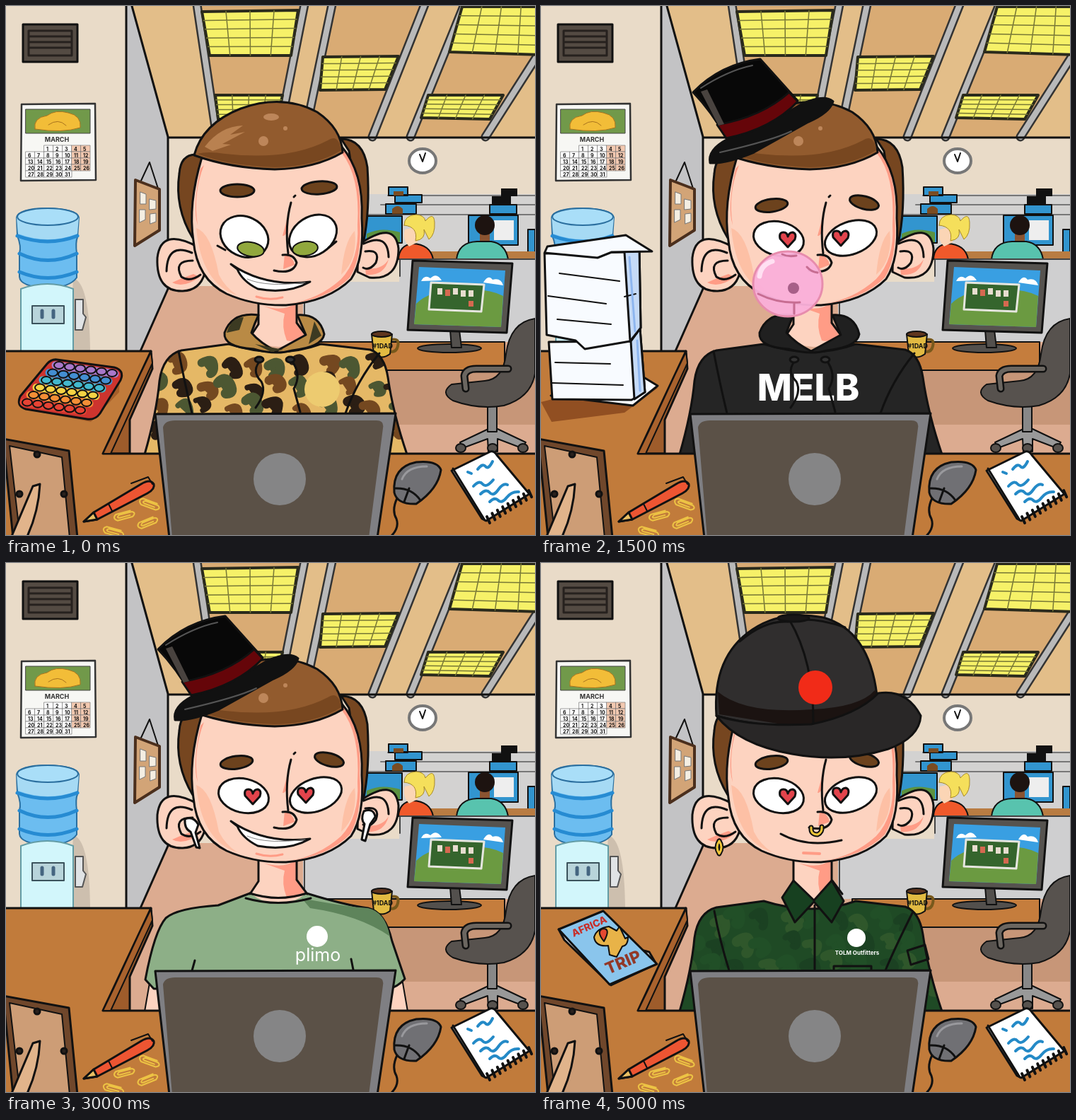
An HTML page with a canvas for the animation above (5500 ms loop, 748x748 px).

```html
<!DOCTYPE html>
<html lang="en">
<head>
<meta charset="utf-8">
<title>Office outfits</title>
<style>
html,body{margin:0;width:100%;height:100%;overflow:hidden}
canvas{display:block;width:100%;height:100%}
</style>
</head>
<body>
<canvas width="748" height="748"></canvas>
<script>
const g = document.querySelector('canvas').getContext('2d');
g.lineJoin = g.lineCap = 'round';
const SKIN = '#fdd3c0', BLUSH = '#ff9c86', BROW = '#6c421d', IRIS = '#91a83d';
const range = n => [...Array(n).keys()];
const lerp = (a, b, t) => a + (b - a) * t;

function fill(d, color) {
  g.fillStyle = color;
  g.fill(new Path2D(d));
}
function line(d, width = 3, color = '#111') {
  g.lineWidth = width;
  g.strokeStyle = color;
  g.stroke(new Path2D(d));
}
function ink(d, color, width = 3, edge) {
  fill(d, color);
  line(d, width, edge);
}
function oval(x, y, rx, ry, color, width = 3, angle = 0, edge = '#111') {
  g.beginPath();
  g.ellipse(x, y, rx, ry, angle * Math.PI / 180, 0, 7);
  g.fillStyle = color;
  g.fill();
  g.lineWidth = width;
  g.strokeStyle = edge;
  if (width) g.stroke();
}
function write(text, x, y, size, color = '#111', weight = 700, angle = 0, align = 'left', family = 'Inter,sans-serif') {
  g.save();
  g.translate(x, y);
  g.rotate(angle * Math.PI / 180);
  g.font = `${weight} ${size}px ${family}`;
  g.textAlign = align;
  g.fillStyle = color;
  g.fillText(text, 0, 0);
  g.restore();
}
function clipped(d, paint) {
  g.save();
  g.clip(new Path2D(d));
  paint();
  g.restore();
}

// Ceiling lamp: a quad with evenly spaced slats.
function lamp([ax, ay, bx, by, cx, cy, dx, dy]) {
  let grid = '';
  for (const t of [.2, .4, .6, .8]) grid += `M${lerp(ax, dx, t)} ${lerp(ay, dy, t)}L${lerp(bx, cx, t)} ${lerp(by, cy, t)}`;
  for (const t of [.25, .5, .75]) grid += `M${lerp(ax, bx, t)} ${lerp(ay, by, t)}L${lerp(dx, cx, t)} ${lerp(dy, cy, t)}`;
  ink(`M${ax} ${ay}L${bx} ${by} ${cx} ${cy} ${dx} ${dy}Z`, '#f6f168', 4, '#2a2a1c');
  line(grid, 1.5, '#777735');
}

function room() {
  fill('M0 0H748V748H0Z', '#e9dbc8');
  fill('M229 396H748V640H130L190 488Z', '#dcab90');
  fill('M170 0H178L229 185V400L190 490H170Z', '#c3c3c5');
  fill('M178 0H748V186H229Z', '#e3be89');
  fill('M270 0H422L385 186H298ZM461 0H592L518 186H422ZM648 0H748V75L678 186H572Z', '#d9ab74');
  for (const [a, b] of [[270, 298], [422, 385], [461, 422], [592, 518], [648, 572], [754, 678]]) {
    const d = `M${a} ${a > 750 ? 66 : -2}L${b} 185`;
    line(d, 13, '#333');
    line(d, 8, '#b9b9b9');
  }
  [[277,8,413,6,403,70,288,70], [448,72,555,71,536,118,444,119], [645,1,756,1,756,69,627,65],
    [597,126,703,126,684,160,587,158], [296,126,391,126,384,160,300,160]].forEach(lamp);
  fill('M229 186H415V396H229Z', '#e9dbc8');
  line('M170 0V488M178 0L229 185V400L190 488M229 186H748');
  ink('M24 26H101V79H24Z', '#544b43');
  line('M32 35H93V70H32ZM34 43H91M34 51H91M34 59H91', 3, '#26211e');
  calendar();
  line('M191 247L203 221L215 258', 2);
  ink('M183 246L217 259V317L182 339Z', '#d2a477', 4, '#4b2f1d');
  ink('M190 263l8 3v14h-8zM203 273l9 2v12l-9 1zM189 288h8v14l-8 4zM204 294l8-1v12l-8 3z', '#f4eee2', 1, '#777');
  cooler();
  coworkers();
  ink('M440 475H705V515H440Z', '#c57d3d', 2);
  line('M544 472Q557 469 554 481Q552 490 543 489', 4, '#78591c');
  ink('M517 464H546L543 492Q531 501 520 492Z', '#e2ba42', 2);
  oval(531, 464, 14, 4, '#60361e', 2);
  write('#1DAD', 518, 484, 9);
  monitor();
  chair();
}

function calendar() {
  ink('M22 139L126 138 127 246 21 247Z', '#f7f7f4', 2.5, '#333');
  ink('M28 146H119V180H28Z', '#71994a', 1, '#444');
  ink('M41 174Q38 158 58 155Q70 146 88 151Q107 155 105 172Q80 180 41 174Z', '#f2bd38', 1, '#a8731e');
  line('M60 168Q74 158 85 169', 1, '#a8731e');
  write('MARCH', 72, 192, 9, '#333', 700, 0, 'center');
  for (const i of range(31)) {
    const n = i + 2, x = 28 + n % 7 * 13, y = 205 + (n / 7 | 0) * 9;
    ink(`M${x} ${y - 8}h13v9h-13z`, n % 7 > 4 ? '#f3c9b0' : '#fff', .7, '#777');
    write(i + 1, x + 3, y, 7);
  }
}

function cooler() {
  fill('M95 385Q118 390 119 488H90Z', '#cdbfae');
  ink('M15 299Q18 286 59 286Q100 287 103 299L101 327Q98 334 100 350V384Q90 398 59 399Q20 397 19 383V350Q22 340 16 325Z', '#6cbdf0', 2, '#2b6f9f');
  fill('M15 299Q59 280 103 299L101 322Q60 338 17 322Z', '#a6daf4');
  line('M19 350Q59 369 100 350M19 376Q59 393 100 376M16 325Q59 341 101 325', 5, '#268bd2');
  oval(59, 298, 43, 12, '#a9def8', 2, 0, '#2b6f9f');
  ink('M21 400Q59 386 95 400V490H21Z', '#d2f6fb', 2, '#639ca5');
  ink('M37 424H82V449H37Z', '#b8d4da', 2, '#3b525c');
  line('M51 431v9M67 431v9', 5, '#456580');
  ink('M98 415H109V435L113 440 108 458H98Z', '#e0e3e5', 2, '#555');
}

function coworkers() {
  oval(589, 219, 19, 17, '#fff', 4, 0, '#777');
  line('M585 210L589 220L593 208', 2);
  fill('M500 266H748V358H500Z', '#d3d2d1');
  line('M540 268H748M530 281H748M505 295H748', 2, '#777');
  ink('M541 256h27v12h-27zM550 267h38v11h-38zM537 280h43v14h-43zM506 297h54v38h-54zM684 281h38v13h-38zM738 316h10v36h-10zM654 296h70v42h-70z', '#3295cf', 2);
  fill('M700 258h23v11h-23zM687 269h27v11h-27z', '#111');
  fill('M690 303h28v28h-28z', '#eee');
  fill('M510 322Q530 312 557 320V334H510Z', '#5c9240');
  fill('M548 262h14v6h-14zM546 287q8-8 15 0v7h-15z', '#7a4c22');
  fill('M500 347H748V358H500Z', '#b97c42');
  ink('M555 358Q556 338 575 336Q600 337 604 358Z', '#f0592b', 2);
  fill('M564 316Q560 330 570 340L582 334V312Z', '#fbd5b5');
  ink('M563 310Q563 296 580 295Q592 296 593 304Q605 290 606 306Q607 323 598 330L591 316Q594 330 579 332Q583 312 563 310Z', '#f5df5b', 1, '#a88a25');
  fill('M670 318h14v16h-14z', '#8a5431');
  ink('M637 358Q640 334 666 333H686Q706 336 710 358Z', '#58c3ae', 2);
  oval(677, 310, 14, 14, '#1d1310', 0);
  fill('M420 390H556L557 358H748V475H420Z', '#cfcfd0');
  line('M422 420V474M557 358H748M557 358V382', 2, '#444');
  fill('M440 515H748V592H540Z', '#c79678');
}

function monitor() {
  oval(627, 484, 45, 6, '#53504d', 2);
  ink('M628 458h13l3 25h-14z', '#53504d', 2);
  ink('M575 360L716 364 708 462 568 458Z', '#56534f');
  fill('M584 369L706 374 700 454 577 450Z', '#399fe2');
  fill('M580 421Q600 401 640 402Q680 398 703 410L700 454 577 450Z', '#6b9a41');
  fill('M587 389q5-10 13-4q9-9 16 3zM675 391q7-12 13-4q12-3 15 8z', '#fff');
  ink('M601 391L676 394 672 432 598 429Z', '#35652d', 3, '#e6e6df');
  fill('M610 399h7v9h-7zM632 399h7v9h-7zM654 402h7v9h-7zM643 402h7v9h-7z', '#e7ddcf');
  fill('M621 401h7v9h-7zM654 417h7v8h-7z', '#d56950');
}

function chair() {
  ink('M682 598L642 617 646 625 681 612 682 630H695V612L729 625 735 617 695 598Z', '#999', 2);
  ink('M681 560h13v42h-13z', '#888', 2);
  ink('M748 442Q713 447 707 492Q703 528 677 530L630 535Q613 547 632 558Q668 571 704 565Q742 554 748 520Z', '#57524e', 2);
  const arm = 'M650 541L648 523Q650 512 668 513H710';
  line(arm, 11);
  line(arm, 6, '#6b6660');
  for (const x of [643, 688, 731]) oval(x, 625, 7, 6, '#57524e', 2);
}

const BODY = 'M196 634Q213 575 217 530Q222 494 248 487L315 478Q385 500 445 478L515 486Q535 493 540 525Q547 575 567 634Z';

function camouflage(colors, seed) {
  const rnd = () => (seed = seed * 16807 % 2147483647) / 2147483647;
  clipped(BODY, () => {
    for (const i of range(44)) {
      const x = 196 + i % 11 * 34 + rnd() * 16, y = 496 + (i / 11 | 0) * 30 + rnd() * 14;
      const d = `M${x} ${y}q${9 + rnd() * 10} ${-14 + rnd() * 10} 17 2t${-3 - rnd() * 8} ${9 + rnd() * 6}`;
      ink(d, colors[i % 3], 7 + rnd() * 8, colors[i % 3]);
    }
  });
  line(BODY);
}

function neck() {
  fill('M357 410H412V450L425 467Q386 497 345 467L357 450Z', SKIN);
  fill('M363 424Q393 433 410 420V445L422 466Q408 476 397 473Q389 453 394 435Z', BLUSH);
  line('M357 418V450L345 468M411 418V448L426 468');
}
function hood(color) {
  neck();
  ink('M357 437Q320 432 309 462Q307 482 350 485Q381 494 405 487Q447 482 450 464Q443 435 412 437L424 465Q402 477 382 488Q360 477 347 462Q351 450 357 437Z', color);
  line('M244 488Q252 530 263 576M528 491Q496 530 480 576M362 499Q345 515 361 531Q369 546 353 568M403 500Q419 521 407 541L416 574');
  oval(358, 500, 6, 4, '#333');
  oval(402, 500, 6, 4, '#333');
}
function shirt(color, shade) {
  ink('M196 634L204 588H560L568 634Z', SKIN, 2);
  ink('M197 589Q210 520 226 502Q242 488 300 484L345 467Q385 480 425 467Q480 484 512 488Q536 493 546 535L564 588Q553 600 541 602H209Z', color);
  fill('M418 474Q480 486 512 488Q536 493 543 528Q500 498 430 488Z', shade);
  line('M267 562L262 580M488 560L492 580');
  neck();
  line('M339 474Q385 487 431 474M345 467Q385 480 425 467');
}

// Hand-drawn notes hovering in the air.
function sums() {
  const note = (s, x, y, size = 26, angle = 0) => write(s, x, y, size, '#ffffffcc', 'italic 300', angle, 'left', '"Open Sans","Noto Sans",sans-serif');
  line('M189 150L192 207 255 195M194 194L207 170 216 178 231 155 234 165 241 150M205 210L245 204M481 441H538M428 432H454M433 433L429 456M445 433L444 456M471 424Q464 444 473 465M547 421Q559 444 546 467', 2, '#ffffffcc');
  note('= 22', 506, 195, 27, -8);
  note('+ 8', 511, 278, 22);
  note('x+y=2', 206, 285, 31);
  note('if x = 2', 163, 332);
  note('then x = ..', 163, 367);
  note('11010', 267, 400, 28);
  note('ϕ', 268, 436);
  note('n', 288, 442, 20);
  note('A', 484, 358);
  note('2', 499, 326, 22);
  note('16√2', 414, 412);
  note('5', 475, 402, 17);
  note('+ 5', 490, 415, 23);
  note('1+n', 487, 437, 19);
  note('2 + n', 491, 463, 19);
}

function head() {
  ink('M272 341Q219 312 214 356Q212 404 250 403Q274 402 281 378Z', SKIN);
  ink('M498 338Q550 301 555 343Q555 388 514 384L497 376Z', SKIN);
  fill('M265 379Q250 384 235 391Q251 400 274 383ZM508 371Q532 374 541 358Q535 382 509 380Z', BLUSH);
  line('M263 349Q228 334 227 375M264 360Q236 360 248 383Q260 391 275 380M506 336Q540 320 541 355M508 347Q530 344 523 363Q514 375 505 370');
  ink('M270 210Q247 209 245 237Q238 285 264 328L279 215Z', '#764620');
  ink('M474 188Q505 188 511 228Q515 290 505 336L485 205Z', '#764620');
  const face = 'M277 214Q257 280 265 332Q270 386 312 407Q350 424 396 423Q456 418 488 386Q507 357 503 300Q506 235 474 198Z';
  fill(face, SKIN);
  fill('M269 314Q290 320 301 380Q310 398 327 409Q276 393 269 314ZM493 318Q478 333 474 380Q498 358 493 318Z', '#fdc0a5');
  fill('M474 207Q501 240 497 310Q500 358 474 386Q442 415 400 421Q455 415 486 384Q504 356 500 298Q504 236 474 198ZM275 230Q263 285 271 310Q264 265 280 225Z', BLUSH);
  line(face);
  const hair = 'M266 211Q278 166 332 145Q391 124 440 150Q474 173 476 207Q437 230 380 231Q315 229 266 211Z';
  fill(hair, '#925b2e');
  fill('M271 209Q285 205 310 209Q400 219 455 190Q470 180 474 204Q437 227 380 228Q315 226 271 209Z', '#784720');
  fill('M281 199Q303 170 335 169L317 182 338 178 306 195 318 196 292 205Z', '#b98150');
  oval(375, 157, 11, 5, '#bd865a', 0);
  oval(364, 191, 7, 7, '#bd865a', 0);
  oval(395, 173, 3, 3, '#bd865a', 0);
  line(hair);
}
function nose() {
  fill('M394 351Q406 354 408 366L392 372ZM397 303L391 325Q399 325 399 303Z', BLUSH);
  line('M403 278Q394 310 399 350M391 352Q407 350 411 363Q406 380 379 374M409 268L407 270');
}
function heart(x, y) {
  ink(`M${x} ${y + 10}l-11-12q-2-9 5-9q5 0 6 6q2-6 7-6q6 2 3 10z`, '#e2444c');
}

const items = {
  camo() {
    fill(BODY, '#e5b866');
    camouflage(['#2b1e14', '#744820', '#4c5732'], 71);
    hood('#b98a45');
    fill('M312 462Q318 441 336 440L330 458ZM352 478L392 486 375 489ZM428 478L446 466 436 446Z', '#3c3a22');
    oval(447, 542, 25, 25, '#edcb70', 0);
  },
  black() {
    ink(BODY, '#252525');
    write('MELB', 378, 558, 52, '#fff', 800, 0, 'center');
    hood('#202020');
  },
  army() {
    fill(BODY, '#1f4a25');
    camouflage(['#1b4122', '#2f572b', '#214f27'], 19);
    neck();
    ink('M357 449L341 473 359 508 386 479 411 508 428 478 411 449 386 477Z', '#174020');
    line('M387 484V576M245 492Q253 535 266 576M525 495Q500 545 487 576M518 548L543 540 548 560 523 568ZM414 576V570H467V576');
    oval(446, 530, 13, 13, '#fff', 0);
    write('TOLM Outfitters', 447, 554, 8, '#fff', 700, 0, 'center');
  },
  tee() {
    shirt('#302827', '#171312');
    oval(384, 540, 24, 24, '#fff', 0);
  },
  green() {
    shirt('#8daf87', '#5e845b');
    oval(440, 528, 15, 15, '#fff', 0);
    write('plimo', 441, 563, 25, '#fff', 400, 0, 'center');
  },

  look() {
    oval(337, 326, 35, 28, '#fff', 3, 25);
    oval(434, 325, 36, 27, '#fff', 3, -33);
    oval(346, 344, 19, 10, IRIS, 2, 10);
    oval(423, 343, 18, 10, IRIS, 2, -7);
    line('M299 339L310 345M456 342L467 333');
    oval(327, 261, 24, 9, BROW);
    oval(443, 257, 25, 9, BROW, 3, -4);
  },
  angry() {
    ink('M305 307Q336 288 369 323ZM404 325Q423 295 467 302Z', SKIN);
    const eyes = 'M306 307Q325 327 368 322Q366 351 345 356Q303 352 306 307ZM404 325Q440 328 467 302Q474 345 430 354Q403 352 404 325Z';
    fill(eyes, '#fff');
    clipped(eyes, () => {
      oval(344, 344, 19, 11, IRIS, 2);
      oval(423, 342, 18, 11, IRIS, 2);
    });
    line(eyes);
    oval(350, 275, 17, 7, BROW, 3, 17);
    oval(433, 273, 17, 8, BROW, 3, -27);
    line('M374 283L389 292M409 291L416 284', 3, BLUSH);
  },
  love() {
    oval(336, 329, 36, 24, '#fff', 3, 13);
    oval(438, 328, 38, 23, '#fff', 3, -20);
    heart(349, 331);
    heart(424, 329);
    oval(326, 282, 23, 9, BROW, 3, -8);
    oval(457, 278, 21, 9, BROW, 3, 15);
  },

  grin() {
    ink('M318 365Q366 398 430 390Q398 408 356 400Q334 389 327 372Z', '#fff');
    line('M341 386Q368 398 423 391', 1, '#888');
    line('M354 411Q372 417 391 412', 3, BLUSH);
  },
  talk() {
    ink('M350 394Q367 396 379 388Q392 392 409 393Q408 410 381 411Q358 409 350 394Z', '#271414');
    fill('M363 404Q376 396 395 405Q381 413 363 404Z', '#de6b67');
    fill('M369 394L380 390 396 393 390 397H372Z', '#fff');
  },
  wave() { line('M345 395Q358 402 370 394Q380 387 389 395Q405 402 430 390'); },
  smile() {
    line('M339 383Q375 403 425 392');
    line('M371 410L394 411', 4, BLUSH);
  },
  gum() {
    oval(349, 393, 49, 46, '#fab0daf4', 3, 0, '#e78cad');
    line('M307 407Q335 421 366 419M358 420V435M341 351Q349 355 361 353M376 369Q382 376 391 377', 3, '#c76d92');
    oval(357, 399, 8, 8, '#a75f88', 0);
    line('M309 382Q311 366 327 361', 7, '#ffe0f2');
  },

  glasses() {
    ink('M288 322L373 325 368 355 298 358ZM404 323L490 320 478 353 410 357Z', '#a5dce2aa');
    line('M263 331L288 332M373 335Q389 326 405 334M489 329L514 325');
    line('M322 327L305 353M341 327L326 353M436 326L424 352M451 326L441 351', 5, '#e5fbfb99');
  },
  monocle() {
    oval(337, 337, 35, 31, '#d2d3cdbb', 8);
    oval(337, 337, 35, 31, '#0000', 4, 0, '#d9b73b');
    line('M316 337L345 314M326 349L358 323', 6, '#ffffff80');
    g.setLineDash([3, 7]);
    line('M264 332Q273 358 303 362', 7);
    g.setLineDash([]);
  },
  pods() {
    ink('M253 362Q265 357 272 370L268 381 274 403 269 402 261 380Q252 376 253 362Z', '#fff');
    ink('M506 351Q520 346 522 359L515 369 508 393 503 391 507 369Q501 363 506 351Z', '#fff');
  },
  rings() {
    const d = 'M252 393q6 9 0 18q-6-9 0-18M382 374Q381 384 391 384Q398 381 397 373';
    line(d, 7);
    line(d, 3, '#f0c638');
  },
  tophat() {
    ink('M239 222Q235 203 264 188Q329 163 368 139Q400 124 413 135Q408 151 378 164L301 207Q263 223 239 222Z', '#111');
    ink('M215 122Q254 82 310 75L363 134Q326 174 262 187Q242 150 215 122Z', '#080808');
    ink('M249 168Q312 157 351 122L363 135Q326 174 262 187Z', '#650509');
    fill('M226 121L251 169 259 167 235 118Z', '#49433f');
    line('M226 116Q265 91 299 84M253 207Q327 190 354 177', 2, '#555');
  },
  cap() {
    ink('M248 216Q242 132 299 94Q340 66 399 77Q464 95 475 187Q430 232 360 232Q300 230 248 216Z', '#302e2e');
    fill('M252 214L250 182Q288 214 383 207Q451 204 472 180L475 188Q430 231 360 231Z', '#1b1311');
    ink('M248 216Q300 232 382 228Q447 215 477 184Q517 178 537 216Q535 247 491 263Q427 283 355 270Q280 257 248 216Z', '#292727');
    line('M351 80Q386 139 385 227M281 111Q315 81 349 83Q382 74 430 91');
    oval(357, 78, 22, 5, '#181717');
    oval(388, 176, 24, 24, '#f12b18', 0);
  },

  popit() {
    fill('M25 570L120 588 160 546 161 522 132 565Z', '#a55e29');
    ink('M72 500L153 511Q168 515 162 529L133 576Q126 586 114 584L28 570Q14 566 20 552L58 506Q64 499 72 500Z', '#cd342e');
    ['#a978ca', '#438ed2', '#42b8ce', '#f4d344', '#f58e36', '#e64334'].forEach((color, r) => {
      const x = 75 - r * 9, y = 508 + r * 10.5;
      line(`M${x - 5} ${y}L${x + 79} ${y + 12}`, 11, color);
      for (const i of range(6)) oval(x + i * 15, y + i * 2.2, 7, 5, color, 2);
    });
  },
  papers() {
    const white = '#f8fbff', blue = '#c5daf7';
    fill('M0 560L15 588 118 575 165 540 140 525Z', '#914f22');
    ink('M14 551L130 565 165 537 142 523Z', white);
    ink('M11 475L127 474 140 456 147 546 128 557 16 556Z', white);
    ink('M127 474L140 456 147 546 132 556Z', blue);
    ink('M5 350L118 348 139 340 141 455 126 474 62 485 49 473 8 465Z', white);
    ink('M118 348L139 340 141 455 126 474Z', blue);
    ink('M9 340L120 324 157 347 100 348 80 356 5 349Z', white);
    line('M26 378L111 389M10 410L92 421M23 443L99 450M20 504L98 506M16 533L116 536M118 411L134 407', 2);
    line('M125 355L133 460M136 473L140 544', 3, '#8eb6ef');
  },
  plant() {
    fill('M64 560Q39 595 48 605L88 618 134 563Z', '#91501f');
    ink('M50 480H143L126 560Q97 572 67 559Z', '#9f5139');
    ink('M45 469Q65 456 97 458Q140 459 148 468L143 489Q97 496 49 487Z', '#b5664a');
    oval(97, 469, 49, 10, '#6b3929');
    line('M130 496L123 551', 5, '#d89072');
    ink('M24 382Q14 364 28 355Q28 335 51 334Q61 317 77 330Q103 331 98 351Q110 364 101 373Q120 367 126 377Q147 365 150 384Q145 405 121 407Q112 421 101 405L86 397Q72 406 64 391Q41 400 24 382Z', '#6ac46f', 2);
    fill('M66 335q29 3 29 19q-4 20-23 10zM28 365q18 4 28 19l-25-1zM103 386q18 1 21 14l-19 4z', '#36804b');
    const stem = 'M95 470Q101 430 87 406L63 371M98 428Q105 409 126 397';
    line(stem, 8);
    line(stem, 4, '#725039');
    for (const [x, y] of [[91, 321], [116, 347], [24, 337], [48, 402], [138, 412]]) oval(x, y, 7, 3, '#61af5c', 2, x);
  },
  trip() {
    ink('M25 518L33 533 99 597 163 567 153 550Z', '#e9eef3');
    ink('M25 518L88 492 164 567 97 596Z', '#8ac5ec');
    ink('M75 529Q79 516 96 514L107 520 111 514 119 531 123 529Q123 541 115 542L107 557 97 554 95 541Q77 543 75 529Z', '#e8b348', 2);
    ink('M89 535Q77 520 88 517Q99 517 89 535Z', '#e44831', 2);
    write('AFRICA', 46, 529, 14, '#c72e29', 800, -24);
    write('TRIP', 95, 582, 23, '#923827', 800, -23);
  },
  blonde() {
    const pale = '#fff0df', red = '#dd2c19';
    ink('M51 186Q50 145 108 138Q188 132 213 174Q217 209 226 229Q239 275 207 289Q185 293 160 269L120 252Q96 290 64 288Q27 286 31 247Q36 226 51 211Z', '#fbeaa0');
    ink('M118 247V278L82 288 84 330 128 358 166 326 164 290 154 279V252Z', pale);
    ink('M104 188Q95 188 86 195Q75 205 86 219Q98 225 107 215Q113 245 137 258Q155 268 174 257Q211 238 213 186Q165 180 123 164Z', pale);
    line('M100 205Q82 194 88 216M129 199Q142 205 155 201Q146 213 133 208M174 205Q188 214 205 211M124 193L106 184M202 211L220 220M162 224Q173 231 180 221M125 185Q143 181 151 191M177 192Q191 193 199 187', 2);
    oval(141, 207, 4, 4, '#222', 0);
    oval(197, 214, 4, 4, '#222', 0);
    oval(119, 218, 10, 7, '#fac9b9', 0);
    ink('M139 244Q149 235 156 239Q164 236 173 245Q158 257 139 244L172 245', '#dc817b', 2);
    line('M89 174Q125 142 180 159M43 245Q47 267 58 274M200 245Q217 264 208 278', 8, '#fffbe6');
    ink('M177 356L192 351Q197 389 185 400L142 455Q157 466 156 486H147L132 460Q150 410 165 396Z', pale);
    ink('M60 286Q73 280 86 280Q83 323 100 338Q127 359 151 339Q169 323 164 286L184 287Q192 319 192 355L177 360Q173 387 143 402Q130 413 126 438Q145 453 131 487H5Q-2 440 32 407Q70 375 86 347L78 356H50Q48 301 60 286Z', red);
    fill('M90 360Q121 384 165 364Q150 401 107 384Z', '#aa292b');
    line('M82 350Q111 383 175 354M84 344Q77 361 72 375M128 326Q125 343 130 354M100 447Q119 441 127 429', 2);
    oval(67, 299, 11, 7, '#ed6a58', 0);
    ink('M53 356H77Q85 431 80 502L106 522Q112 532 84 520L97 542Q94 550 77 525L80 552Q71 557 69 526L54 551Q47 555 57 525L40 537Q38 527 62 502Q65 432 53 356Z', pale);
  }
};

function desk() {
  ink('M205 488L207 513 175 585V633H137Z', '#9e5c2b');
  ink('M-4 488H205L137 633H752V752H-4Z', '#c17b3b');
  ink('M205 489L190 520 151 604 137 633H148L207 505Z', '#a9622d', 2);
}

function foreground() {
  ink('M-4 612L89 629 101 752H10Z', '#70472b');
  ink('M5 622L79 638 90 752H20Z', '#cd9d76', 2);
  ink('M38 679L48 676Q46 716 29 752H7Z', '#e1b48b');
  for (const [x, y] of [[44, 634], [19, 690], [82, 690]]) oval(x, y, 4, 4, '#29211d');
  ink('M110 729L124 716 191 676Q204 668 209 676Q211 683 200 689L129 726Z', '#ed5532');
  ink('M110 729L124 716 129 726Z', '#eac063');
  line('M145 704L150 714M177 675L201 666 207 676', 2);
  for (const [x, y, angle] of [[167, 720, -15], [203, 704, 20], [200, 730, -22], [152, 743, 15]]) {
    g.save();
    g.translate(x, y);
    g.rotate(angle * Math.PI / 180);
    line('M10-4H-11Q-18 0-11 5H11Q18 1 12-2H-7Q-12 1-7 2H8', 2, '#edc344');
    g.restore();
  }
  ink('M211 577L551 576 525 752H231Z', '#7f7f83');
  fill('M222 596Q224 586 239 586H524Q535 586 533 597L513 752H235Z', '#5b5147');
  oval(387, 669, 37, 37, '#858586', 0);
  line('M553 696Q545 713 552 725Q557 739 542 752');
  ink('M549 688Q546 652 580 645Q610 642 615 656Q611 683 580 704Q553 705 549 688Z', '#707074');
  line('M550 682Q574 681 586 699M570 682L563 701');
  line('M560 669Q567 651 595 651', 3, '#99999d');
  ink('M630 657L685 630Q690 629 694 635L740 690 679 728 673 725Z', '#fff');
  line('M632 654L677 727');
  line(range(9).map(i => `M${680 + i * 7.4} ${722 - i * 4.6}l4 9`).join(''), 4);
  line('M653 659l5 2M667 655q7-9 11-4t10-7M661 679q8-9 13-3t15-6M671 690q8-8 13-2t12-4t13-7M684 701q7-7 12-2t12-4t17-8', 4, '#248ac7');
}

// Clothes, eyes, mouth, then extras in drawing order.
const poses = [
  'camo look grin popit',
  'green love smile cap plant',
  'tee angry talk glasses sums blonde',
  'black love gum tophat papers',
  'army look wave pods popit',
  'camo angry talk pods sums blonde',
  'green love grin tophat pods',
  'tee look gum cap papers',
  'black angry wave monocle sums plant',
  'camo look grin glasses rings',
  'army love smile cap rings trip'
].map(p => p.split(' '));
const behindDesk = ['glasses', 'monocle', 'pods', 'rings', 'tophat', 'cap', 'sums'];
let shown = -1;

function paint([clothes, eyes, mouth, ...extras]) {
  room();
  items[clothes]();
  head();
  items[eyes]();
  nose();
  items[mouth]();
  const near = extras.filter(e => !behindDesk.includes(e));
  for (const e of extras) if (behindDesk.includes(e)) e === 'sums' ? sums() : items[e]();
  desk();
  for (const e of near) items[e]();
  foreground();
}

function tick() {
  const index = Math.floor(performance.now() % 5500 / 500);
  if (index !== shown) paint(poses[shown = index]);
  requestAnimationFrame(tick);
}
tick();
</script>
</body>
</html>
```
